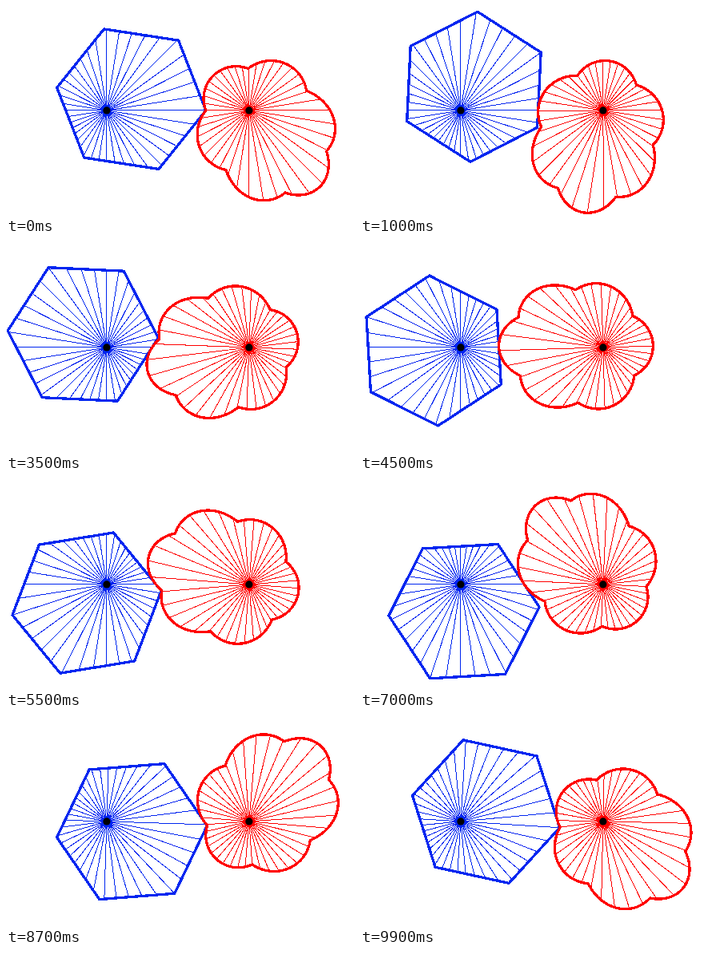
An HTML page for the animation above (10 s loop, 435 by 262 pixels).

```html
<!DOCTYPE html>
<html>
<head>
<meta charset="utf-8">
<style>
html, body { margin: 0; width: 100%; height: 100%; overflow: hidden; background: #fff; }
svg { display: block; }
path { fill: none; shape-rendering: crispEdges; }
.rim { stroke-width: 3.3; stroke-linejoin: round; }
</style>
</head>
<body>
<svg width="435" height="262" viewBox="0 0 435 262">
  <g id="hexagon" stroke="#0026f0"></g>
  <g id="mate" stroke="#f00"></g>
  <g id="hubs"></g>
</svg>
<script>
const TAU = 2 * Math.PI, STEPS = 1440, SPOKES = 40;
const RADIUS = 94.2, OFFSET = { x: 30.8, y: -14.3 };
const pivot = { x: 125.9, y: 130.95 };
const LOOP = 10000, TICK = 100;
const phase = Math.asin(-OFFSET.y / RADIUS);   // puts one corner at angle 0

// Distance from the pivot to the hexagon's edge in direction a
function reach(a) {
  let best = Infinity;
  for (let k = 0; k < 6; k++) {
    const n = phase + (k + 0.5) * TAU / 6;
    const facing = Math.cos(n - a);
    const edge = RADIUS * Math.cos(TAU / 12) + OFFSET.x * Math.cos(n) + OFFSET.y * Math.sin(n);
    if (facing > 1e-6) best = Math.min(best, edge / facing);
  }
  return best;
}

const radii = Array.from({ length: STEPS }, (_, i) => reach(i / STEPS * TAU));

// Angle turned by the rolling mate at each step, for a given axle distance
function rolled(dist) {
  const turn = [0];
  for (let i = 0; i < STEPS; i++) {
    const r = (radii[i] + radii[(i + 1) % STEPS]) / 2;
    turn.push(turn[i] + r / (dist - r) * TAU / STEPS);
  }
  return turn;
}

// Axle distance at which both wheels make one full turn together
let low = 150, high = 220;
for (let i = 0; i < 40; i++) {
  const mid = (low + high) / 2;
  if (rolled(mid)[STEPS] > TAU) low = mid; else high = mid;
}
const dist = high, turn = rolled(dist);

const polar = (r, a) => `${(r * Math.cos(a)).toFixed(2)},${(r * Math.sin(a)).toFixed(2)}`;
const matePoint = i => polar(dist - radii[i], Math.PI - turn[i]);

// Spoke of the mate at angle a past its starting contact
function mateSpoke(a) {
  const i = turn.findIndex(t => t >= a - 1e-6);
  return polar(dist - radii[i], Math.PI - a);
}

const spokes = point => Array.from({ length: SPOKES }, (_, k) => `M0,0L${point(k / SPOKES * TAU)}`).join('');

function build(id, rim, point) {
  const g = document.getElementById(id);
  g.innerHTML = `<path d="${spokes(point)}"/><path class="rim" d="M${rim.join('L')}Z"/>`;
  return g;
}

const corners = Array.from({ length: 6 }, (_, k) => {
  const a = phase + k * TAU / 6;
  return `${OFFSET.x + RADIUS * Math.cos(a)},${OFFSET.y + RADIUS * Math.sin(a)}`;
});
const hexagon = build('hexagon', corners, a => polar(reach(a), a));
const mate = build('mate', radii.map((_, i) => matePoint(i)), mateSpoke);

const hub = x => `<circle cx="${x}" cy="${pivot.y}" r="4.6"/>`;
document.getElementById('hubs').innerHTML = hub(pivot.x) + hub(pivot.x + dist);

function place(g, x, angle) {
  g.setAttribute('transform', `translate(${x} ${pivot.y}) rotate(${angle * 360 / TAU})`);
}

function draw(now) {
  const share = Math.floor(now % LOOP / TICK) * TICK / LOOP;
  place(hexagon, pivot.x, -share * TAU);
  place(mate, pivot.x + dist, turn[Math.round(share * STEPS)]);
  requestAnimationFrame(draw);
}
draw(performance.now());
</script>
</body>
</html>
```
